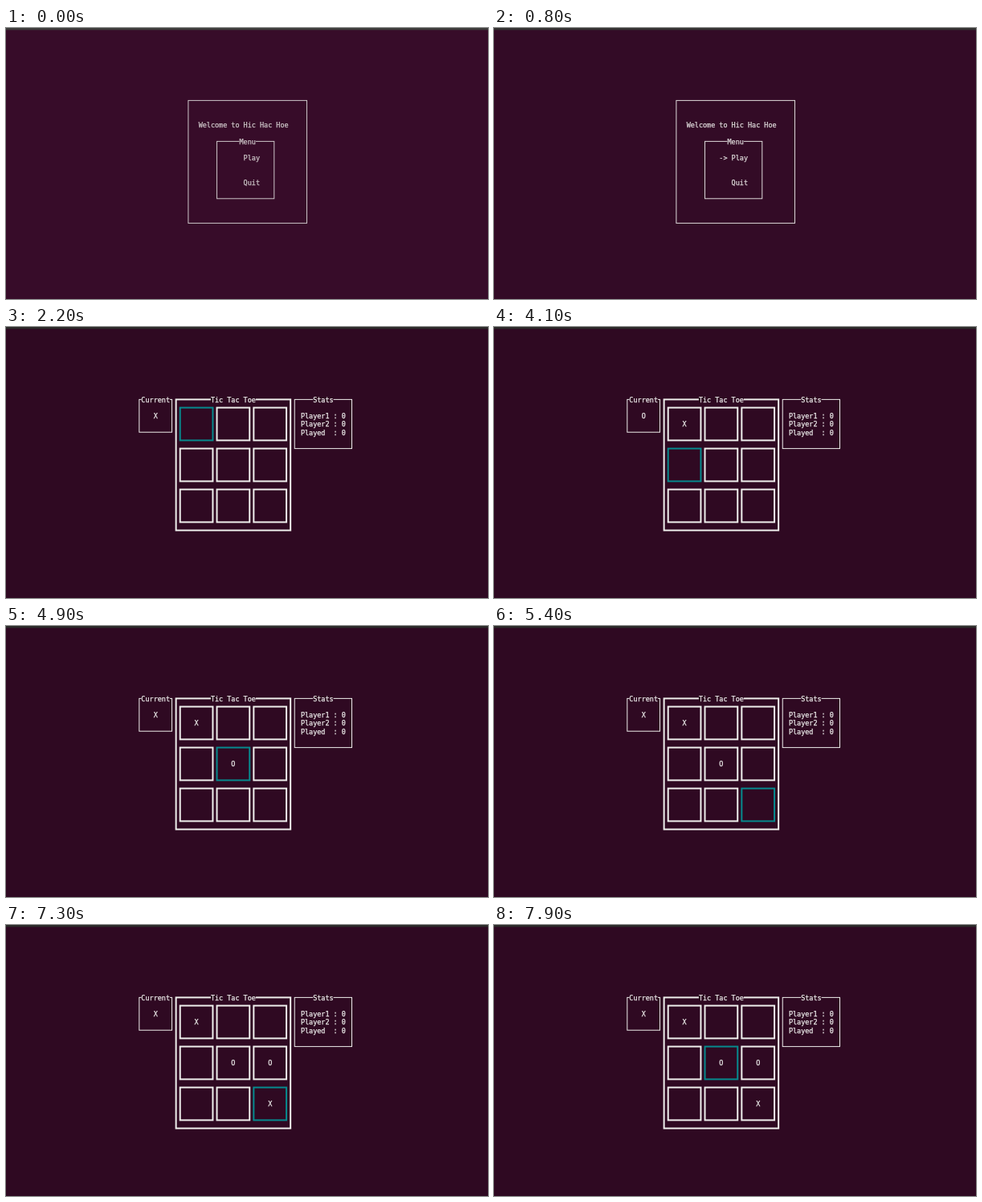
These frames come from a looping animation (600 px wide and 338 px high, 8000 ms). An HTML page with a canvas:

```html
<!DOCTYPE html>
<html lang="en">
<head>
<meta charset="utf-8">
<title>Terminal tic tac toe</title>
<style>
html, body { margin: 0; height: 100%; overflow: hidden; background: #2f0922; }
canvas { display: block; }
</style>
</head>
<body>
<canvas id="stage" width="600" height="338"></canvas>
<script>
const ctx = document.getElementById('stage').getContext('2d');
const LOOP = 8000, TEAL = '#06898d';

// Keys pressed in the game: arrows move the cursor, Enter places a mark
const keys = {
  3600: 'Enter', 3800: 'Down', 4300: 'Right', 4800: 'Enter',
  5100: 'Down', 5300: 'Right', 5600: 'Enter', 6000: 'Up', 6200: 'Enter',
  7000: 'Down', 7400: 'Left', 7900: 'Up'
};
const steps = { Up: -3, Down: 3, Left: -1, Right: 1 };

// Terminal grid: left edge of a column, middle of a row
const colX = col => 0.4 + col * 5.09;
const rowY = row => 90.4 + row * 10.2;

const mix = (a, b, k) => `rgb(${a.map((v, i) => Math.round(v + (b[i] - v) * k))})`;

function text(str, col, row) {
  const x = colX(col), y = rowY(row) + 3.3;
  ctx.fillText(str, x, y);
  ctx.lineWidth = 0.25;
  ctx.strokeText(str, x, y);
}

// Lines run through the middle of their character cells
function box(col, row, cols, rows, line, color) {
  ctx.save();
  ctx.lineWidth = line;
  ctx.strokeStyle = color;
  ctx.strokeRect(colX(col + 0.5), rowY(row), colX(cols) - colX(0), rowY(rows) - rowY(0));
  ctx.restore();
}

function titled(title, titleCol, col, row, cols, rows, line, bg, ink) {
  box(col, row, cols, rows, line, ink);
  ctx.fillStyle = bg;
  ctx.fillRect(colX(titleCol), rowY(row) - 2, colX(title.length) - colX(0), 4);
  ctx.fillStyle = ink;
  text(title, titleCol, row);
}

function drawMenu(t, bg, ink) {
  box(44, 0, 29, 15, 1, ink);
  titled('Menu', 57, 51, 5, 14, 7, 1, bg, ink);
  text('Welcome to Hic Hac Hoe', 47, 3);
  text('Play', 58, 7);
  text('Quit', 58, 10);
  if (t >= 100) text('->', 55, 7);
}

function drawGame(t, bg, ink) {
  const placed = [];
  let cursor = 0;
  for (const time in keys) {
    if (t < time) break;
    if (keys[time] === 'Enter') placed.push(cursor);
    else cursor += steps[keys[time]];
  }
  const mark = i => 'XO'[i % 2];

  titled('Current', 33, 32, 0, 8, 4, 1, bg, ink);
  text(mark(placed.length), 36, 2);

  titled('Tic Tac Toe', 50, 41, 0, 28, 16, 2, bg, ink);
  for (let i = 0; i < 9; i++) {
    const col = 42 + i % 3 * 9, row = 1 + Math.floor(i / 3) * 5;
    box(col, row, 8, 4, 2, i === cursor ? TEAL : ink);
    if (placed.includes(i)) text(mark(placed.indexOf(i)), col + 4, row + 2);
  }

  titled('Stats', 75, 70, 0, 14, 6, 1, bg, ink);
  ['Player1', 'Player2', 'Played '].forEach((s, i) => text(s + ' : 0', 72, 2 + i));
}

function draw(t) {
  // The screen darkens in four steps
  const k = Math.max(0, Math.min(4, Math.floor((t - 600) / 100))) / 4;
  const bg = mix([55, 12, 41], [47, 9, 34], k);
  const ink = mix([205, 198, 200], [238, 238, 236], k);
  ctx.fillStyle = bg;
  ctx.fillRect(0, 0, 600, 338);
  ctx.fillStyle = mix([62, 61, 60], [44, 43, 42], k);
  ctx.fillRect(0, 0, 600, 2.5);
  ctx.font = '8.46px "DejaVu Sans Mono", monospace';
  ctx.strokeStyle = ink;
  (t < 2000 ? drawMenu : drawGame)(t, bg, ink);
}

const start = performance.now();
function frame() {
  draw((performance.now() - start) % LOOP);
  requestAnimationFrame(frame);
}
frame();
</script>
</body>
</html>
```
